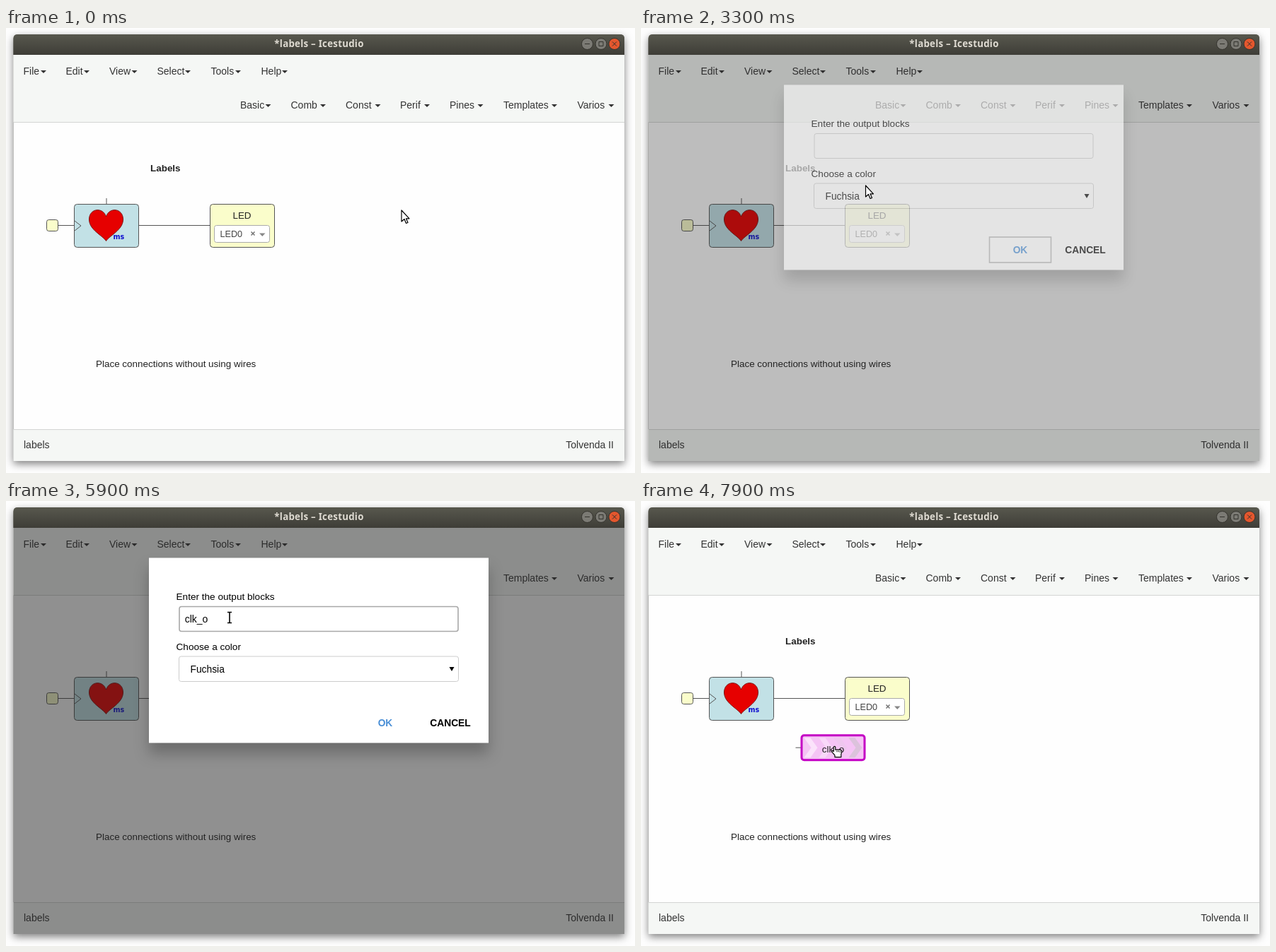
Recreate the animation shown at these times as an HTML page. Size 889 px wide and 630 px high, loop 8000 ms.

```html
<!DOCTYPE html>
<html lang="en">
<head>
<meta charset="utf-8">
<title>Labels</title>
<style>
  html, body { margin: 0; width: 100%; height: 100%; overflow: hidden; background: #fefefe; }
  svg { display: block; font: 14px "Liberation Sans", Arial, sans-serif; fill: #333; }
  .window { filter: drop-shadow(0 4px 6px rgba(0, 0, 0, .5)); }
  .title { font: bold 13.3px "Noto Sans", sans-serif; letter-spacing: .25px; fill: #dfdbd2; }
  .bar { fill: #f5f7f5; }
  .paper { fill: #fefefe; }
  .rule { stroke: #d3d5d3; }
  .diagram { font-size: 13.45px; fill: #222; }
  .outline { stroke: #555; }
  .wire { stroke: #555; fill: none; }
  .yellow { fill: #fafdcb; }
  .bold { font-weight: bold; }
  .mid { text-anchor: middle; }
  .menu { font-size: 13.8px; }
  .panel { fill: #fefefe; stroke: #c8c8c8; filter: drop-shadow(0 6px 6px rgba(0, 0, 0, .18)); }
  .dialog { font-size: 13.8px; fill: #000; }
  .sheet { fill: #fff; filter: drop-shadow(0 15px 10px rgba(0, 0, 0, .25)); }
  .field { fill: #fff; stroke: #ccc; }
  .pointer path { fill: #fff; stroke: #000; stroke-width: 1.2; stroke-linejoin: round; }
</style>
</head>
<body>
<svg width="889" height="630" viewBox="0 0 889 630">
  <defs>
    <linearGradient id="chrome" x2="0" y2="1">
      <stop stop-color="#58584e"/><stop offset="1" stop-color="#3e3d37"/>
    </linearGradient>
  </defs>

  <path class="window" fill="url(#chrome)" d="M10.5 613V15q0-6 6-6H868q6 0 6 6V613z"/>
  <path fill="url(#chrome)" d="M10.5 38V15q0-6 6-6H868q6 0 6 6V38z"/>
  <text class="title mid" x="442.5" y="27">*labels – Icestudio</text>
  <g stroke="#33322d">
    <circle cx="821.5" cy="22.5" r="8" fill="#7b7a74"/>
    <circle cx="841" cy="22.5" r="8" fill="#7b7a74"/>
    <circle cx="860" cy="22.5" r="8" fill="#e4572e"/>
    <path fill="none" d="M818 22.5h7M838 19.5h6v6h-6zM857 19.5l6 6m0-6l-6 6"/>
  </g>

  <rect class="paper" x="10.5" y="38" width="863.5" height="575"/>
  <path class="bar" d="M10.5 38H874v95H10.5zM10.5 568H874v45H10.5z"/>
  <path class="rule" d="M10.5 133.5H874M10.5 568.5H874"/>
  <rect id="basic" x="317" y="85" width="71.5" height="48" fill="#e7e7e6"/>
  <g id="nav"></g>
  <text x="25" y="595">labels</text>
  <text x="859" y="595" text-anchor="end">Tolvenda II</text>

  <g class="diagram">
    <text class="bold" x="204" y="203">Labels</text>
    <text x="127" y="479.5">Place connections without using wires</text>
    <path class="wire" d="M73 279.5H96M188 279.5H288M142 241v8"/>
    <rect class="yellow outline" x="57.5" y="271.5" width="16" height="16" rx="3"/>
    <rect class="outline" x="96.5" y="249.5" width="91" height="61" rx="4" fill="#c2e1e6"/>
    <path class="wire" d="M97 273l9 7-9 7"/>
    <path fill="#e60000" stroke="#7c1010" d="M141.500 301.500C137 294 117.500 286 117.500 271C117.500 255 137 253 141.500 267C146 253 165.500 255 165.500 271C165.500 286 146 294 141.500 301.500z"/>
    <text x="151.500" y="299" font-family="DejaVu Sans, sans-serif" font-size="9.600" class="bold" style="fill:#1010d0">ms</text>
    <rect class="yellow outline" x="288.5" y="249.5" width="91" height="61" rx="4"/>
    <text class="mid" x="333.5" y="269.5">LED</text>
    <rect x="294.5" y="279.5" width="78" height="24" rx="3" fill="#fff" stroke="#aaa"/>
    <text x="302.500" y="295.500" font-size="12.600" fill="#444">LED0</text>
    <path stroke="#777" stroke-width="1.6" d="M346.500 288.500l5 5m0-5l-5 5"/>
    <path fill="#888" d="M358 290.500h8.500l-4.250 4.500z"/>
  </g>

  <g id="block" class="diagram">
    <path class="wire" d="M-7 19H1"/>
    <rect x="1.500" y="1.500" width="89" height="35" rx="3.500" fill="#f5c4f5"/>
    <g id="chevrons"></g>
    <rect x="1.500" y="1.500" width="89" height="35" rx="3.500" fill="none" stroke="#c400c4" stroke-width="3"/>
    <text class="mid" x="46" y="25.500">clk_o</text>
  </g>

  <g id="menu" class="menu">
    <path class="panel" d="M235.500 133.500h152V340q0 4-4 4H239.500q-4 0-4-4z"/>
    <rect id="hover" class="bar" x="236" width="151" height="24.900"/>
    <g id="items"></g>
  </g>

  <rect id="dim" x="10.5" y="38" width="863.5" height="575" fill="#252525"/>

  <g id="dialog" class="dialog">
    <rect class="sheet" x="202" y="80.500" width="480" height="262"/>
    <g font-size="13.600">
      <text x="240.500" y="140">Enter the output blocks</text>
      <text x="240.500" y="211">Choose a color</text>
    </g>
    <rect id="input" class="field" x="245" y="149.500" width="394" height="35" rx="3"/>
    <text id="typed" x="252.700" y="171.500" font-size="14"></text>
    <rect id="caret" y="159" width="1" height="16"/>
    <rect class="field" x="244.500" y="220" width="395" height="35.500" rx="3"/>
    <text x="260.500" y="242.500">Fuchsia</text>
    <path d="M626.500 235h7l-3.500 6z"/>
    <rect id="focus" x="492.500" y="296" width="87" height="36" fill="none" stroke="#b5b5b5" stroke-width="1.600"/>
    <text id="ok" class="bold mid" x="536" y="319" fill="#4a8fd6">OK</text>
    <text class="bold mid" x="628" y="319">CANCEL</text>
  </g>

  <g id="pointer" class="pointer">
    <path id="arrow" d="M0 0V16L4 12.500L6.500 18.500L9 17.500L6.500 11.800H11z"/>
    <g id="hand" transform="translate(-5.500 -1)">
      <path d="M3.500 11L1 8.500Q.8 6.500 3 7.200L3.800 8V2Q3.800.7 5 .7T6.300 2V5.500H13Q15.300 6 15.300 8L14.300 12V16H5.500V13.500z"/>
      <path d="M8.500 7v1.500M10.800 7v1.500M13 7.500v1.500"/>
    </g>
    <g id="ibeam">
      <path style="fill:none;stroke:#fff;stroke-width:3.500" d="M-3-7.500H3M0-7V7M-3 7.500H3"/>
      <path style="fill:none;stroke-width:1.600" d="M-3-7.500H3M0-7V7M-3 7.500H3"/>
    </g>
  </g>
</svg>

<script>
const el = id => document.getElementById(id);
const show = (id, on) => { el(id).style.display = on ? '' : 'none'; };
const ROW = 24.9, MENU_TOP = 139;

// label, text x, caret x
const navRow = (baseline, entries) => entries.map(([label, x, caretX]) =>
  `<text x="${x}" y="${baseline}">${label}</text>
   <path d="M${caretX} ${baseline - 6}h8l-4 4z"/>`).join('');
el('nav').innerHTML =
  navRow(66, [['File', 24.5, 49], ['Edit', 84.5, 110], ['View', 146, 177.5],
    ['Select', 213.5, 253], ['Tools', 289.5, 324], ['Help', 360.5, 390]]) +
  navRow(114, [['Basic', 331, 366.5], ['Comb', 402.5, 444], ['Const', 480, 521.5], ['Perif', 557, 591],
    ['Pines', 627, 666.5], ['Templates', 703, 771], ['Varios', 807.5, 851.5]]);

const yellow = '#f5f08c', mustard = '#eadf7c';
el('items').innerHTML = [['Input', yellow], ['Output', yellow], ['Output label', yellow], ['Input label', yellow],
  ['Constant', mustard], ['Memory', mustard], ['Code', '#bcdfe8'], ['Information', '#dcdcdc']]
  .map(([label, color], i) => `<rect x="255" y="${148 + i * ROW}" width="8" height="8" fill="${color}"/>
    <text x="273.5" y="${156.3 + i * ROW}">${label}</text>`).join('');

el('chevrons').innerHTML = [[5, '#fbe2fb'], [26, '#f9d8f9'], [47, '#efc6ef'], [68, '#dcc2dc']]
  .map(([x, color]) => `<path fill="${color}" d="M${x} 5h9l10 14-10 14h-9l10-14z"/>`).join('');

// Pointer hot spot: time, x, y
const path = [[100, 559, 258], [600, 349, 112], [1200, 349, 112], [1900, 317.5, 223], [3700, 317.5, 223],
  [4100, 316, 165], [6100, 316, 165], [6600, 511, 307], [6700, 511, 307], [7000, 528, 309],
  [7300, 528, 309], [7900, 274, 347.7]];
const keyTimes = [4800, 4900, 5000, 5200, 5400];

function pointerAt(t) {
  if (t <= path[0][0]) return path[0].slice(1);
  const i = path.findIndex(p => t <= p[0]);
  const [t0, x0, y0] = path[i - 1], [t1, x1, y1] = path[i];
  const u = (t - t0) / (t1 - t0), k = u * u * (3 - 2 * u);
  return [x0 + (x1 - x0) * k, y0 + (y1 - y0) * k];
}

function draw(t) {
  const within = (a, b) => t >= a && t < b;
  const [x, y] = pointerAt(t);

  const menuOpen = within(800, 3000), row = Math.floor((y - MENU_TOP) / ROW);
  show('basic', menuOpen);
  show('menu', menuOpen);
  show('hover', row >= 0);
  el('hover').setAttribute('y', MENU_TOP + row * ROW);

  const closing = t >= 7200;
  const fade = closing ? Math.max(0, (7400 - t) / 300) : Math.min(1, Math.max(0, (t - 3000) / 500));
  el('dim').style.opacity = fade / 2;
  el('dialog').style.opacity = closing ? fade ** 2.7 : fade;

  const typing = t >= 4100;
  show('focus', !typing);
  el('input').style.stroke = typing ? '#a8a8a8' : '#ccc';
  el('input').style.strokeWidth = typing ? 1.6 : 1;
  el('typed').textContent = 'clk_o'.slice(0, keyTimes.filter(k => t >= k).length);
  el('caret').setAttribute('x', Math.floor(252.7 + el('typed').getComputedTextLength()));
  show('caret', within(4100, 4700) || within(4800, 5900) || within(6400, 6900));
  el('ok').style.fill = t >= 6800 ? '#5c9bd6' : '#4a8fd6';

  show('block', closing);
  el('block').setAttribute('transform', `translate(${x - 48.5} ${y - 17.5})`);

  const hand = within(600, 3000) || t >= 6500, ibeam = within(4000, 6200);
  show('hand', hand);
  show('ibeam', ibeam);
  show('arrow', !hand && !ibeam);
  el('pointer').setAttribute('transform', `translate(${x} ${y})`);
}

function tick() {
  draw(Math.floor(performance.now() % 8000 / 100) * 100);
  requestAnimationFrame(tick);
}
tick();
</script>
</body>
</html>
```
